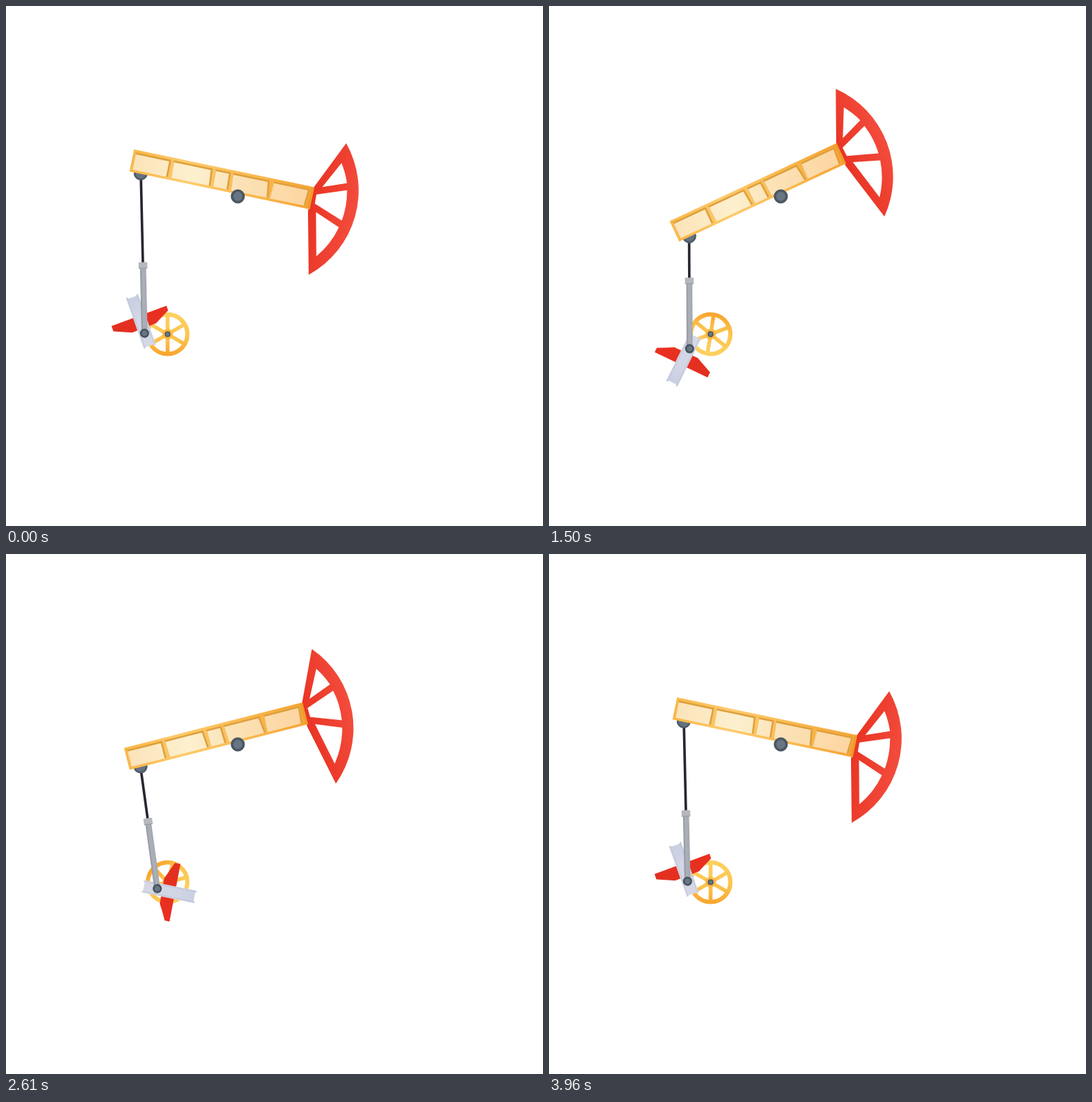
An HTML page for the animation above (3.99 s loop, 761x736 px).

```html
<!DOCTYPE html>
<html lang="en">
<head>
<meta charset="utf-8">
<title>Pump jack</title>
<style>
  html, body { margin: 0; width: 100%; height: 100%; overflow: hidden; background: #fff; }
  svg { display: block; width: 761px; height: 736px; }
</style>
</head>
<body>
<svg viewBox="0 0 761 736" xmlns="http://www.w3.org/2000/svg">
  <defs>
    <linearGradient id="frame">
      <stop offset="0" stop-color="#f9b748"/>
      <stop offset=".3" stop-color="#fdcb6c"/>
      <stop offset=".6" stop-color="#fbbd55"/>
      <stop offset="1" stop-color="#f5a433"/>
    </linearGradient>
    <linearGradient id="cream" gradientUnits="userSpaceOnUse" x1="-157" y1="0" x2="100" y2="0">
      <stop offset="0" stop-color="#fbe3b8"/>
      <stop offset=".35" stop-color="#fdf0cf"/>
      <stop offset=".6" stop-color="#fbe2b6"/>
      <stop offset="1" stop-color="#fdd5a0"/>
    </linearGradient>
    <linearGradient id="red">
      <stop offset="0" stop-color="#e93424"/>
      <stop offset=".5" stop-color="#ee4030"/>
      <stop offset="1" stop-color="#f34c3d"/>
    </linearGradient>
    <linearGradient id="weight" x1="0" y1="0" x2="0" y2="1">
      <stop offset="0" stop-color="#e22f20"/>
      <stop offset="1" stop-color="#ea3020"/>
    </linearGradient>
    <linearGradient id="steel">
      <stop offset="0" stop-color="#d6d8e6"/>
      <stop offset=".6" stop-color="#d3d6e5"/>
      <stop offset="1" stop-color="#c8cfe2"/>
    </linearGradient>
    <linearGradient id="tube">
      <stop offset="0" stop-color="#92969e"/>
      <stop offset=".4" stop-color="#acb0b8"/>
      <stop offset="1" stop-color="#a4a8b0"/>
    </linearGradient>
    <linearGradient id="gold" gradientUnits="userSpaceOnUse" x1="0" y1="-31" x2="0" y2="31">
      <stop offset="0" stop-color="#fdd160"/>
      <stop offset=".6" stop-color="#fcc34c"/>
      <stop offset="1" stop-color="#f8a32c"/>
    </linearGradient>
  </defs>

  <g id="wheel" fill="none" stroke="url(#gold)">
    <circle r="28" stroke-width="6"/>
    <path id="spokes" stroke-width="5.4"/>
    <circle r="7.5" fill="#fbb842" stroke="none"/>
    <circle r="3.4" fill="#687683" stroke="#45525d" stroke-width="1.4"/>
  </g>

  <g id="crank">
    <path fill="url(#weight)" d="M37-43 38 40 31 40Q26 29 19.500 18L18.500-18.500 29-43Z"/>
    <path fill="url(#steel)" d="M-9-10.500H67.500V-8.500L65.500-7.500V4.500L67.500 5.500V7.500H-9V5.500L-7.500 4.500V-7.500L-9-8.500Z"/>
    <path stroke="#bcc1d4" stroke-width=".8" d="M-8-8.700H67M-8 5.700H67"/>
  </g>

  <line id="rod" stroke="#2b2530" stroke-width="3.6"/>
  <g id="cylinder">
    <rect x="-4.300" y="-94" width="8.600" height="94" fill="url(#tube)"/>
    <rect x="-6.200" y="-100.500" width="12.400" height="8.800" rx="1" fill="#b5b8bc"/>
    <path d="M-6-92H6" stroke="#94989e"/>
    <circle r="5.200" fill="#687683" stroke="#475460" stroke-width="2.600"/>
  </g>

  <g id="beam">
    <path fill="url(#red)" fill-rule="evenodd" d="M135-105A135.800 135.800 0 0 1 121 88L101.600 0V-32Z
      M134.200-76.300A120 120 0 0 1 147.600-50L114.500-37.500Z
      M108.500-25.500 149.700-40.300A118.500 118.500 0 0 1 151.300 3.300L109-12.300Z
      M113-.800 149.200 13.500A120 120 0 0 1 126.300 60.300Z"/>
    <circle cx="-141.300" cy="-4" r="8.700" fill="#657380" stroke="#4d5a66" stroke-width="2.600"/>
    <rect x="-157.500" y="-35" width="261" height="32" fill="url(#frame)"/>
    <g id="panels"></g>
    <path d="M101.500-34V-4" stroke="#f09a2b" stroke-width="3"/>
  </g>
  <circle cx="328.500" cy="269.500" r="8.200" fill="#687683" stroke="#4b5863" stroke-width="3.600"/>
</svg>
<script>
const el = id => document.getElementById(id);
const PIVOT = [328.5, 269.5], HUB = [229, 464.5], AXLE = [202.4, 473.5];
const LOOP = 3990, STEPS = 111, RAD = Math.PI / 180;

// step, beam angle in degrees
const SWING = [[0, 11.8], [17, -2.3], [30, -14], [48.5, -31], [54, -27.9], [73, -14.3], [86, -5.2], [111, 11.8]];
// left, right, slant of each beam panel
const PANELS = [[-154.5, -103, 0], [-99.5, -43, 2], [-38.5, -16.5, 1], [-13.5, 39.5, 3], [45.5, 98, -2]];

el('panels').innerHTML = PANELS.map(([l, r, s]) =>
  `<path d="M${l}-30.500H${r}L${r + s}-6.500H${l + s / 2}Z" fill="url(#cream)"/>
   <path d="M${l}-30H${r - 1}L${r + s - 1}-6.500" fill="none" stroke="#dfa03c" stroke-width="2.6"/>
   <path d="M${l + .5}-30L${l + s / 2 + .5}-6.500" fill="none" stroke="#efb95b"/>`).join('');

el('spokes').setAttribute('d', [0, 1, 2, 3, 4, 5].map(i => {
  const a = (30 + 60 * i) * RAD;
  return `M0 0L${27 * Math.cos(a)} ${27 * Math.sin(a)}`;
}).join(''));

function stepAt(t) {
  if (t < 30) return 0;
  const slot = Math.floor(t % 180 / 30);
  return 5 * Math.floor(t / 180) + 1 + Math.max(0, slot - 1);
}

function swing(k) {
  const i = Math.max(1, SWING.findIndex(p => p[0] >= k));
  const [k0, a0] = SWING[i - 1], [k1, a1] = SWING[i];
  return a0 + (a1 - a0) * (k - k0) / (k1 - k0);
}

const polar = ([x, y], r, deg) => [x + r * Math.cos(deg * RAD), y + r * Math.sin(deg * RAD)];
const place = (id, [x, y], deg) => el(id).setAttribute('transform', `translate(${x} ${y}) rotate(${deg})`);

function draw(t) {
  const k = stepAt(t), turn = 360 * k / STEPS;
  // both wheels run slightly unevenly over the loop
  const sway = Math.sin(turn * RAD), lag = Math.sin(turn / 2 * RAD);
  const tilt = swing(k);
  const crank = -109.5 - turn + 2.7 * sway;
  const wheel = -4 * turn + 10 * lag + 7 * sway;
  const pin = polar(AXLE, 12, crank - 11);
  const knob = polar(PIVOT, 141.4, tilt + 181.8);
  const lean = Math.atan2(pin[1] - knob[1], pin[0] - knob[0]) / RAD - 90;

  place('beam', PIVOT, tilt);
  place('crank', AXLE, crank);
  place('wheel', HUB, wheel);
  place('cylinder', pin, lean);
  const ends = { x1: knob[0], y1: knob[1], x2: pin[0], y2: pin[1] };
  for (const name in ends) el('rod').setAttribute(name, ends[name]);
}

const start = performance.now();
function tick() {
  draw((performance.now() - start) % LOOP);
  requestAnimationFrame(tick);
}
tick();
</script>
</body>
</html>
```
